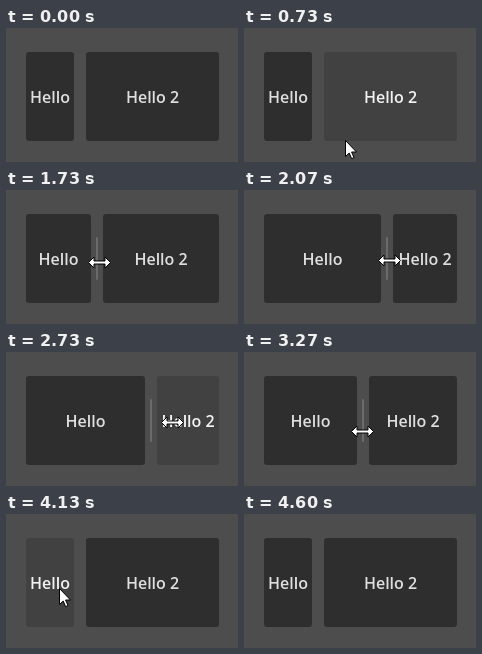
An HTML page that plays this animation: 232x134 px, repeating every 5.47 s.

```html
<!DOCTYPE html>
<html lang="en">
<head>
<meta charset="utf-8">
<title>Split container</title>
<style>
  html, body { margin: 0; width: 100%; height: 100%; overflow: hidden; background: #4d4d4d; }
  svg { display: block; width: 232px; height: 134px; }
  .button rect { fill: #2e2e2e; }
  .button text { fill: #dfdfdf; font: 600 16px "Open Sans", "Noto Sans", sans-serif; text-anchor: middle; }
  .button.hover rect { fill: #414141; }
  .button.hover text { fill: #f2f2f2; }
  .cursor { fill: #fff; stroke: #000; stroke-width: 1; }
</style>
</head>
<body>
<svg viewBox="0 0 232 134">
  <g class="button" id="left"><rect y="24" height="89" rx="3"/><text y="75">Hello</text></g>
  <g class="button" id="right"><rect y="24" height="89" rx="3"/><text y="75">Hello 2</text></g>
  <rect id="grabber" y="47" width="2" height="43" rx="1" fill="#6b6b6b"/>
  <path id="arrow" class="cursor" d="M.5.5V16.5L4.2 13 6.6 18.6 9 17.6 6.6 12H11.5Z"/>
  <path id="resize" class="cursor" d="M-11.5.5L-6-5V-1H5V-5L10.5.5 5 6V2H-6V6Z"/>
</svg>
<script>
const LOOP = 5470, TICK = 200 / 3;
const LEFT = 20, RIGHT = 213, TOP = 24, BOTTOM = 113, GAP = 12;
const MIN_EDGE = 68, MAX_EDGE = 139;
const ENTER = 10, ON_GAP = 15, PRESS = 22, TURN = 40, RELEASE = 60, LEAVE = 69;

const easeIn = power => u => u ** power;
const easeOut = power => u => 1 - (1 - u) ** power;
const easeInOut = u => (1 - Math.cos(Math.PI * u ** 1.2)) / 2;

// Pointer strokes, timed in ticks; each starts where the last one ended
const ENTRY = { x: 109, y: 124 };
const MOVES = [
  { from: ENTER, to: 16, x: 76, y: 72, ease: easeOut(1.5) },
  { from: 21, to: 35, x: 169, y: 70, ease: easeInOut },
  { from: TURN, to: 49, x: 118.5, y: 79, ease: easeIn(1.5) },
  { from: 49, to: 59, x: 53, y: 73.5, ease: easeOut(1.1) },
  { from: 63, to: LEAVE, x: 67, y: 134, ease: easeIn(1.6) }
];

const el = id => document.getElementById(id);
const clamp = (v, lo, hi) => Math.min(hi, Math.max(lo, v));

function pointerAt(tick) {
  let { x, y } = ENTRY;
  for (const move of MOVES) {
    const f = move.ease(clamp((tick - move.from) / (move.to - move.from), 0, 1));
    x += (move.x - x) * f;
    y += (move.y - y) * f;
  }
  return { x, y };
}

// The split trails the pointer, so the grip depends on the direction
function edgeAt(tick, x) {
  if (tick < PRESS) return MIN_EDGE;
  const grip = tick < TURN ? 9 : 5.5;
  return clamp(Math.round(x - grip), MIN_EDGE, MAX_EDGE);
}

function setButton(id, x1, x2, pointer) {
  const button = el(id), [box, label] = button.children;
  box.setAttribute("x", x1);
  box.setAttribute("width", x2 - x1);
  label.setAttribute("x", (x1 + x2) / 2);
  const over = pointer && pointer.x >= x1 && pointer.x < x2 && pointer.y >= TOP && pointer.y < BOTTOM;
  button.classList.toggle("hover", Boolean(over));
}

function show(id, visible) {
  el(id).style.visibility = visible ? "visible" : "hidden";
}

function place(id, { x, y }) {
  el(id).setAttribute("transform", `translate(${Math.round(x)} ${Math.round(y)})`);
}

function draw(time) {
  const tick = Math.floor((time % LOOP + 3.4) / TICK);
  const pointer = pointerAt(tick);
  const inside = tick >= ENTER && tick < LEAVE;
  const gripping = tick >= ON_GAP && tick < RELEASE;
  const edge = edgeAt(tick, pointer.x);

  setButton("left", LEFT, edge, inside && pointer);
  setButton("right", edge + GAP, RIGHT, inside && pointer);
  el("grabber").setAttribute("x", edge + GAP / 2 - 1);
  show("grabber", gripping);
  show("resize", gripping);
  show("arrow", inside && !gripping);
  place("resize", pointer);
  place("arrow", pointer);
}

const start = performance.now();
function loop() {
  draw(performance.now() - start);
  requestAnimationFrame(loop);
}
loop();
</script>
</body>
</html>
```
